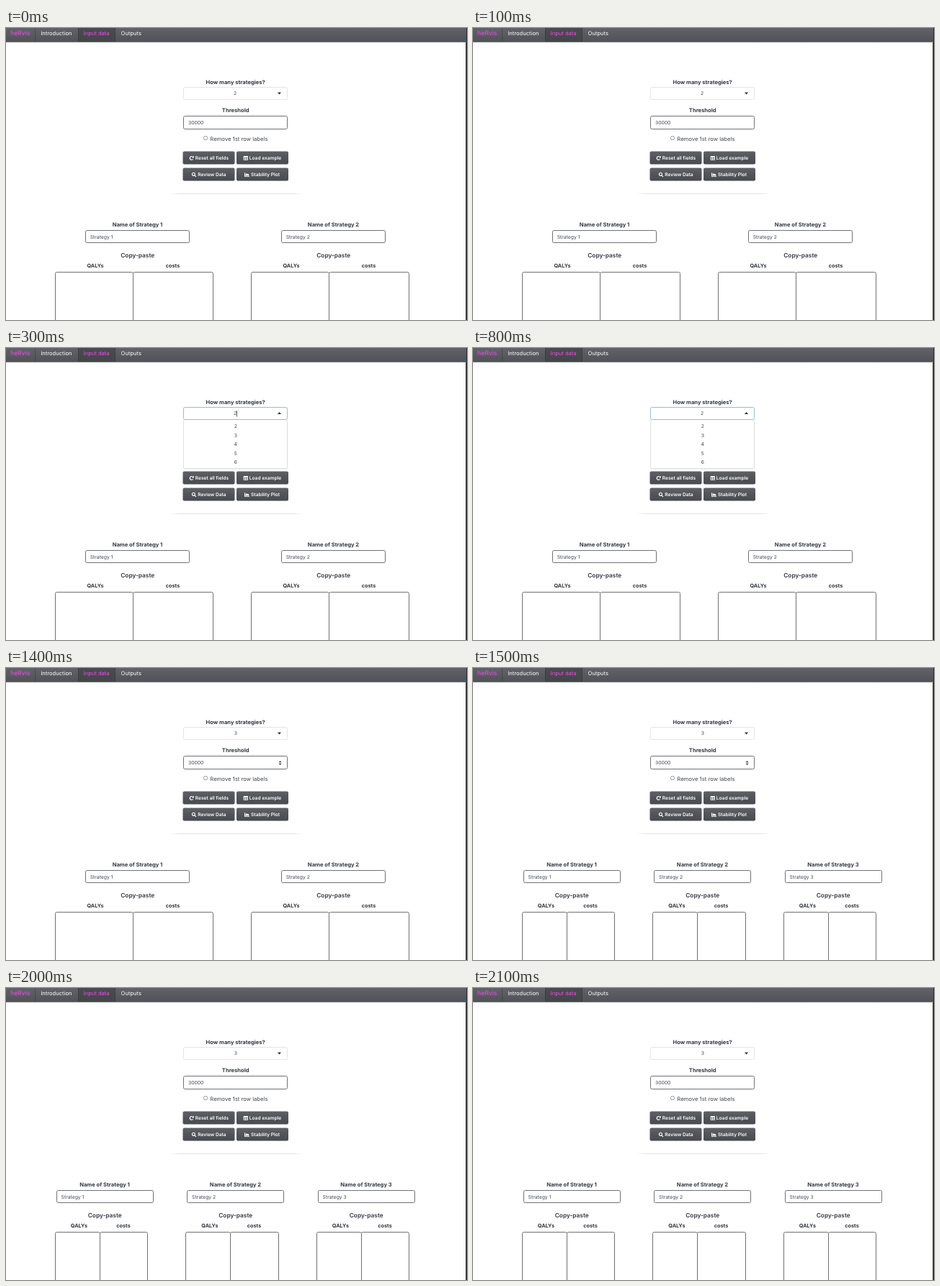
An HTML page with a canvas that plays this animation: 640x406 px, repeating every 2.4 s.

```html
<!DOCTYPE html>
<html lang="en">
<head>
<meta charset="utf-8">
<title>Strategy input form</title>
<style>
  html, body { margin: 0; width: 100%; height: 100%; overflow: hidden; background: #fff; }
  canvas { display: block; width: 640px; height: 406px; }
</style>
</head>
<body>
<canvas id="stage"></canvas>
<script>
const W = 640, H = 406, LOOP = 2400;
const canvas = document.getElementById('stage');
const ratio = window.devicePixelRatio || 1;
canvas.width = W * ratio;
canvas.height = H * ratio;
const c = canvas.getContext('2d');
c.scale(ratio, ratio);
c.textRendering = 'geometricPrecision';

const INK = '#343943', SOFT = '#42474f', LINE = '#6e7175', PINK = '#f04af0';

// y is the middle of the capital letters
function text(s, x, y, size, color = INK, weight = 400, align = 'left') {
  c.font = `${weight} ${size}px Inter, sans-serif`;
  c.textAlign = align;
  c.fillStyle = color;
  c.fillText(s, x, y + size * 0.364);
}

function box(x, y, w, h, r, fill) {
  c.beginPath();
  c.roundRect(x, y, w, h, r);
  c.fillStyle = fill;
  c.fill();
}

// White box with a crisp one-pixel outline through the given edges
function frame(left, top, right, bottom, color = LINE) {
  const [x0, y0, x1, y1] = [left, top, right, bottom].map(v => Math.floor(v) + 0.5);
  box(x0, y0, x1 - x0, y1 - y0, 2, '#fff');
  c.strokeStyle = color;
  c.lineWidth = 1;
  c.stroke();
}

function rect(x, y, w, h, color) {
  c.fillStyle = color;
  c.fillRect(x, y, w, h);
}

function poly(points, color) {
  c.beginPath();
  points.forEach(([x, y]) => c.lineTo(x, y));
  c.fillStyle = color;
  c.fill();
}

function arrow(x, y, half, h) {
  poly([[x - half, y], [x + half, y], [x, y + h]], '#30343a');
}

function fade(y0, y1, ...colors) {
  const g = c.createLinearGradient(0, y0, 0, y1);
  colors.forEach((col, i) => g.addColorStop(i / (colors.length - 1), col));
  return g;
}

function navbar() {
  rect(0, 0, W, 19, fade(0, 19, '#616368', '#585a5f', '#505257'));
  rect(100, 0, 52, 19, fade(0, 19, '#4a4b50', '#444549'));
  [40, 100, 151].forEach(x => rect(x, 0, 1, 19, 'rgba(40,40,46,.35)'));
  rect(0, 19, W, 1, '#77797d');
  text('heRvis', 6, 6.9, 8.7, PINK);
  text('Introduction', 48.3, 7.4, 7.6, '#fff');
  text('Input data', 107.6, 7.4, 7.6, PINK);
  text('Outputs', 159.6, 7.4, 7.6, '#fff');
}

const icons = {
  reload(x, y) {
    c.beginPath();
    c.arc(x, y, 2.4, 0.7, 5.5);
    c.stroke();
    poly([[x + 3.2, y - 3.2], [x + 3.2, y - 0.3], [x + 0.3, y - 0.3]], '#fff');
  },
  table(x, y) {
    box(x - 3.2, y - 2.8, 6.4, 5.6, 0.8, '#fff');
    for (const dx of [-2.4, 0.4])
      for (const dy of [-1, 0.8]) rect(x + dx, y + dy, 2, 1.1, '#505155');
  },
  search(x, y) {
    c.beginPath();
    c.arc(x - 0.6, y - 0.6, 2, 0, 7);
    c.moveTo(x + 0.9, y + 0.9);
    c.lineTo(x + 3, y + 3);
    c.stroke();
  },
  chart(x, y) {
    c.beginPath();
    c.moveTo(x - 3, y - 2.7);
    c.lineTo(x - 3, y + 2.4);
    c.lineTo(x + 3.4, y + 2.4);
    c.stroke();
    poly([[-2, 1.3], [-2, -0.3], [-0.6, -2], [0.6, -0.6], [1.5, -1.4], [2.8, 0.3], [2.8, 1.3]]
      .map(([dx, dy]) => [x + dx, y + dy]), '#fff');
  }
};

function button(x, y, label, labelX, icon, iconX) {
  box(x, y, 72, 18, 2, fade(y, y + 18, '#5f6167', '#525459', '#494b50'));
  c.strokeStyle = '#fff';
  c.lineWidth = 1.1;
  icons[icon](iconX, y + 9.4);
  text(label, labelX, y + 9.4, 6.6, '#fff', 600);
}

function select(value, open, caret) {
  text('How many strategies?', 318.7, 75.1, 7.6, INK, 700, 'center');
  if (open) box(246, 82, 145, 18, 3, 'rgba(120,180,235,.22)');
  frame(246, 82, 390, 99, open ? '#94bbdf' : '#e2e4e7');
  text(value, value === '2' ? 318 : 318.8, 91, 6.8, SOFT, 400, 'center');
  if (caret) rect(320, 87, 0.8, 8.5, '#333');
  if (open) arrow(379.5, 92, 2.6, -2.9);
  else arrow(379.5, 89.6, 2.6, 2.9);
}

function options() {
  box(246, 100, 145.5, 69, 2, 'rgba(0,0,0,.06)');
  frame(246, 99, 390, 167, '#dcdfe2');
  for (let i = 0; i < 5; i++)
    text(String(i + 2), 318.8, 109 + i * 12.5, 6.8, SOFT, 400, 'center');
}

function settings(spinner) {
  text('Threshold', 318.7, 114.6, 7.6, INK, 700, 'center');
  frame(246, 122, 390, 140);
  text('30000', 253, 132, 6.8, SOFT);
  if (spinner) {
    arrow(380.6, 131.2, 2, -2.3);
    arrow(380.6, 132.8, 2, 2.3);
  }
  frame(274, 150, 279, 155, '#909397');
  text('Remove 1st row labels', 283.3, 154, 7.7, SOFT);
}

function buttons() {
  button(245.5, 171.5, 'Reset all fields', 262.8, 'reload', 257.7);
  button(320, 171.5, 'Load example', 337.8, 'table', 332.8);
  button(245.5, 194.5, 'Review Data', 266.3, 'search', 261);
  button(320, 194.5, 'Stability Plot', 340, 'chart', 334.6);
}

function divider() {
  const g = c.createLinearGradient(226, 0, 414, 0);
  g.addColorStop(0, 'rgba(224,226,228,0)');
  g.addColorStop(0.08, '#e2e4e6');
  g.addColorStop(0.92, '#e2e4e6');
  g.addColorStop(1, 'rgba(224,226,228,0)');
  rect(226, 230, 188, 1, g);
}

// Layouts: first panel's positions and the distance between panels
const layouts = {
  2: { pitch: 272, mid: 182.5, input: 110.5, inputEnd: 254.5, left: 68, split: 176, right: 287, q: 124, cost: 231.5 },
  3: { pitch: 181.5, mid: 137, input: 70.4, inputEnd: 204, left: 68, split: 130, right: 196.5, q: 101.4, cost: 163 }
};

function panels(n) {
  const p = layouts[n];
  for (let i = 0; i < n; i++) {
    const dx = i * p.pitch;
    text('Name of Strategy ' + (i + 1), p.mid + dx, 272.9, 7.6, INK, 700, 'center');
    frame(p.input + dx, 281, p.inputEnd + dx, 298);
    text('Strategy ' + (i + 1), p.input + 6.2 + dx, 290.6, 6.8, SOFT);
    text('Copy-paste', p.mid + 0.2 + dx, 315.5, 8.3, INK, 600, 'center');
    text('QALYs', p.q + dx, 330.8, 7.3, INK, 700, 'center');
    text('costs', p.cost + dx, 330.8, 7.3, INK, 700, 'center');
    frame(p.left + dx, 339, p.split + dx, 430);
    frame(p.split + dx, 339, p.right + dx, 430);
  }
}

function draw(t) {
  const open = t >= 300 && t < 1300;
  rect(0, 0, W, H, '#fff');
  navbar();
  settings(t >= 1300 && t < 2000);
  buttons();
  divider();
  panels(t < 1500 ? 2 : 3);
  if (open) options();
  select(t < 1300 ? '2' : '3', open, t >= 300 && t < 800);
  rect(638, 20, 1, H - 20, '#55565a');
  rect(639, 0, 1, H, '#2c2c2e');
}

function tick() {
  draw(performance.now() % LOOP);
  requestAnimationFrame(tick);
}
tick();
</script>
</body>
</html>
```
